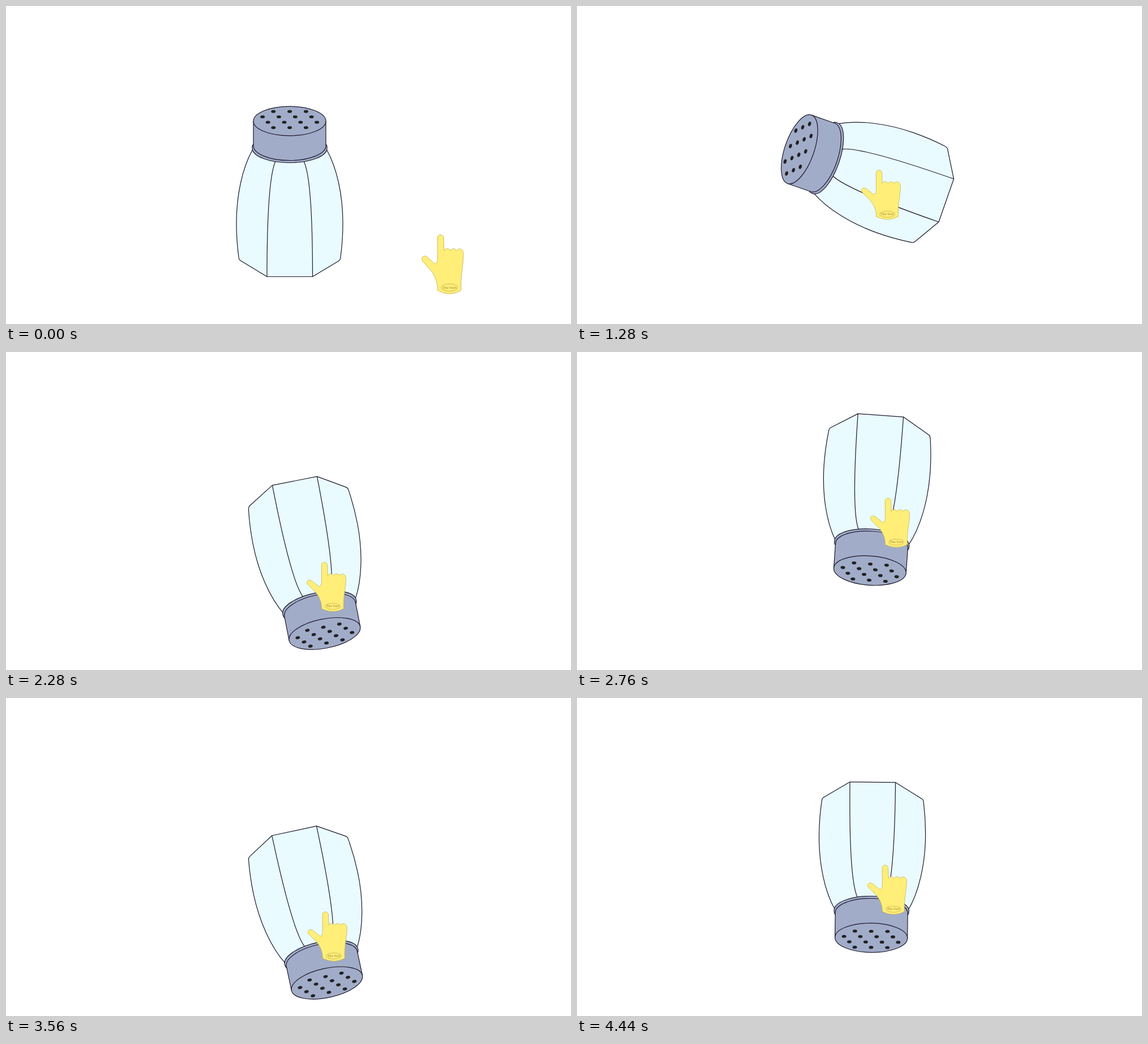
These frames come from a looping animation (998 px wide and 561 px high, 4480 ms). An HTML page without scripts:

```html
<!DOCTYPE html>
<html lang="en">
<head>
<meta charset="utf-8">
<title>Salt shaker</title>
<style>
  html, body { margin: 0; width: 100%; height: 100%; overflow: hidden; background: #fff; }
  svg { display: block; width: 100vw; height: 100vh; }

  .carry, .turn, .slide-x, .slide-y, .grip { animation: 4480ms linear infinite; }
  .carry { animation-name: carry; }
  .turn { animation-name: turn; transform-origin: 501px 327px; }
  .slide-x { animation-name: slide-x; }
  .slide-y { animation-name: slide-y; }
  .grip { animation-name: grip; transform-origin: 768px 404px; }

  /* the glove swoops in along a parabola */
  @keyframes slide-x {
    0% { translate: 0 0; animation-timing-function: cubic-bezier(.333, .295, .667, .628); }
    20.2%, 100% { translate: -243.5px 0; }
  }
  @keyframes slide-y {
    0% { translate: 0 0; animation-timing-function: cubic-bezier(.333, 1.218, .667, 1.552); }
    20.2%, 100% { translate: 0 -81px; }
  }
  @keyframes grip {
    0%, 18.75% { scale: 1 1; }
    20.5%, 100% { scale: .94 .835; }
  }

  /* lift, slow dip, quick shakes, slow return */
  @keyframes carry {
    0%, 23.8% { translate: 0 0; animation-timing-function: cubic-bezier(.4, .2, .7, .6); }
    28.57% { translate: 9px -33px; }
    35.38%, 63.62%, 69.96%, 76.29%, 82.63% { translate: 34px -130px; }
    38.95%, 39.29%, 60.49%, 97.3%, 100% { translate: 20px -28px; }
    49.91%, 66.79%, 73.13%, 79.46%, 85.8% { translate: 40px 56px; }
  }
  @keyframes turn {
    0%, 19.7% { rotate: 0deg; animation-timing-function: cubic-bezier(.4, .25, .75, .68); }
    28.57% { rotate: -70.4deg; }
    35.38%, 63.62%, 69.96%, 76.29%, 82.63% { rotate: -170deg; }
    38.95%, 39.29%, 60.49%, 97.3%, 100% { rotate: -179.4deg; }
    49.91%, 66.79%, 73.13%, 79.46%, 85.8% { rotate: -192.3deg; }
  }

  .ink { stroke: #1c182b; stroke-width: 1.2; stroke-linejoin: round; }
  .glass { fill: #e9fbff; }
  .metal { fill: #a1acc8; }
  .holes { fill: none; stroke: #222; stroke-width: 8; stroke-linecap: round; stroke-dasharray: 0 28.8; }
  .glove { fill: #ffee78; stroke: #b8a347; stroke-width: .7; }
  .badge { fill: none; stroke: #a8943a; stroke-width: .6; }
  .label { font: 6px "Noto Serif", "Liberation Serif", serif; fill: #94803a; text-anchor: middle; }
</style>
</head>
<body>
<svg viewBox="0 0 998 561" preserveAspectRatio="none">
  <g class="carry">
    <g class="turn">
      <g class="ink glass">
        <path d="M437 251C417 285 407 335 407 383C407 408 409 428 411 443Q411.500 447.500 414 449L461 477.500H541.500L588 449.500Q590.500 448 591 443C593 428 595 408 595 383C595 335 585 285 565 251Z"/>
        <path fill="none" d="M476 274C466 296 461 372 461 477.500M526 274C537 296 541.500 372 541.500 477.500"/>
      </g>
      <g class="ink metal">
        <path d="M437.500 243Q434.500 246 435 251A66 25.500 0 0 0 567 251Q567.500 246 564.500 243Z"/>
        <path d="M437 203V246.500A64 26 0 0 0 565 246.500V203Z"/>
        <ellipse cx="501" cy="203" rx="64" ry="25.800"/>
      </g>
      <g class="holes" transform="scale(1 .65)">
        <path d="M472.300 286.200h58"/>
        <path d="M453.200 300.800h87"/>
        <path d="M462.700 315.400h87"/>
        <path d="M472.300 330h58"/>
      </g>
    </g>
    <g class="slide-x"><g class="slide-y"><g class="grip">
      <path class="glove" d="M762.300 409.500a5.500 5.500 0 0 1 11 -.3L774 432c2.500-5 8.500-5 11 0c2.500-5 8.500-5 11 0c4-6 12.500-4 12.300 7C808 456 803 477 804 502Q784 514 762.500 502C763 488 757 474 750 466L736.500 451C732 445 738 438 744 443L757 454.500C761 457.500 762.500 450 762.500 442Z"/>
      <ellipse class="badge" cx="783.500" cy="497" rx="14.300" ry="6.500"/>
      <text class="label" x="783.500" y="499">The Vorl</text>
    </g></g></g>
  </g>
</svg>
</body>
</html>
```
